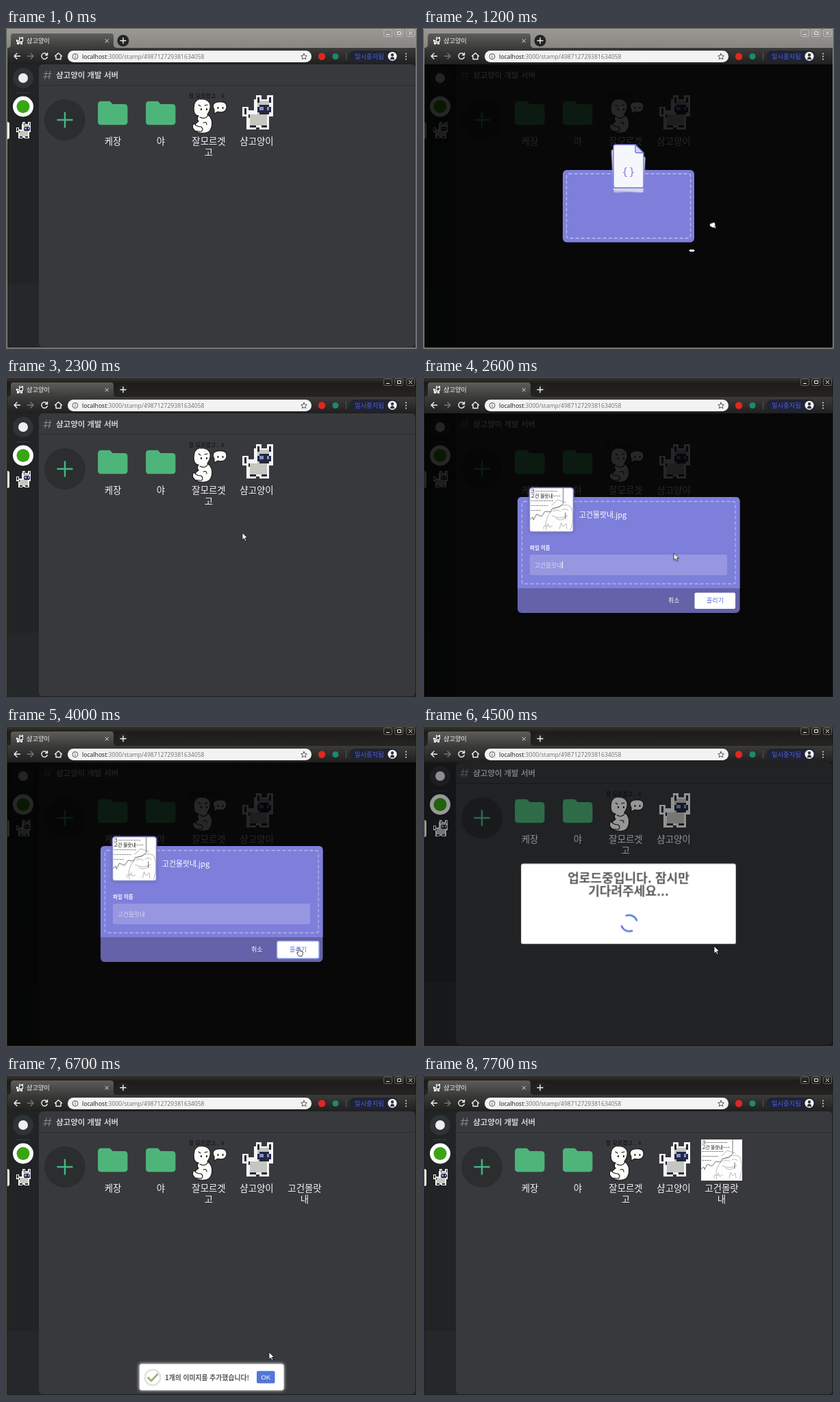
Animation, 600 px wide and 468 px high, one loop 10000 ms. Source, as an HTML page:

```html
<!DOCTYPE html>
<html lang="ko">
<head>
<meta charset="utf-8">
<title>샴고양이</title>
<style>
  html, body { margin: 0; width: 100%; height: 100%; overflow: hidden; background: #1c1b19; }
  svg { display: block; width: 100%; height: 100%; }
  text { font-family: "Noto Sans CJK KR", "Noto Sans CJK", "Noto Sans", sans-serif; }
  .latin { font-family: "Noto Sans", sans-serif; }
  .label { font-size: 13.4px; fill: #f4f4f4; text-anchor: middle; }
  .bold { font-weight: 700; }
  .line { fill: none; stroke-linecap: round; stroke-linejoin: round; }

  /* One loop lasts 10 s, so 1% is one 100 ms step. */
  .anim { animation: 10s step-end infinite; }
  #light { animation-name: light; }
  #dark { animation-name: dark; }
  #shade { animation-name: shade; }
  #drop { animation-name: drop; transform-origin: 300px 260px; }
  #leftPaper { animation-name: fanLeft; transform-origin: 300px 234px; }
  #rightPaper { animation-name: fanRight; transform-origin: 300px 234px; }
  #upload { animation-name: upload; transform-origin: 300px 260px; }
  #caret { animation-name: caret; }
  #ring { animation-name: ring; }
  #wait { animation-name: wait; transform-origin: 300px 260px; }
  #spinner { animation-name: spin; transform-origin: 301px 288px; }
  #progress { animation-name: progress; transform-origin: 2px 54px; }
  #newName { animation-name: newName; }
  #newImage { animation-name: newImage; }
  #toast { animation-name: toast; transform-origin: 300px 440px; }
  #check { animation-name: check; stroke-dasharray: 23; }
  #cursor { animation-name: move; }
  #grab { animation-name: grab; }
  #arrow { animation-name: arrow; }
  #hand { animation-name: hand; }

  @keyframes light { 0% { opacity: 1 } 21%, 100% { opacity: 0 } }
  @keyframes dark { 0% { opacity: 0 } 21%, 100% { opacity: 1 } }
  @keyframes shade {
    0% { opacity: 0 } 9% { opacity: .35 } 10% { opacity: .65 } 11% { opacity: .85 }
    20% { opacity: .55 } 21% { opacity: .2 } 22% { opacity: 0 }
    24% { opacity: .35 } 25% { opacity: .65 } 26% { opacity: .85 }
    41% { opacity: .6 } 42% { opacity: .25 } 43% { opacity: .3 } 44% { opacity: .4 }
    60% { opacity: .25 } 61%, 100% { opacity: 0 }
  }
  @keyframes drop {
    0% { opacity: 0; transform: scale(.8) } 9% { opacity: .3; transform: scale(.85) }
    10% { opacity: .7; transform: scale(.95) } 11% { opacity: 1; transform: none }
    20% { opacity: .55; transform: scale(.95) } 21%, 100% { opacity: 0; transform: scale(.8) }
  }
  @keyframes fanLeft {
    0% { transform: none } 12% { transform: rotate(-3deg); animation-timing-function: steps(3) }
    15%, 100% { transform: translate(-14px, 2px) rotate(-14deg) }
  }
  @keyframes fanRight {
    0% { transform: none } 12% { transform: rotate(3deg); animation-timing-function: steps(3) }
    15%, 100% { transform: translate(14px, 2px) rotate(14deg) }
  }
  @keyframes upload {
    0% { opacity: 0 } 24% { opacity: .35; transform: scale(.85) }
    25% { opacity: .7; transform: scale(.95) } 26% { opacity: 1; transform: none }
    41% { opacity: .5; transform: scale(.95) } 42%, 100% { opacity: 0 }
  }
  @keyframes caret { 0% { opacity: 0 } 26% { opacity: 1 } 31% { opacity: 0 } 36% { opacity: 1 } 39%, 100% { opacity: 0 } }
  @keyframes ring { 0% { opacity: 0 } 39% { opacity: 1 } 42%, 100% { opacity: 0 } }
  @keyframes wait {
    0% { opacity: 0 } 43% { opacity: .8; transform: scale(.88) } 44% { opacity: 1; transform: scale(1.04) }
    45% { opacity: 1; transform: scale(.98) } 46% { opacity: 1; transform: none }
    60% { opacity: .5; transform: scale(.8) } 61%, 100% { opacity: 0 }
  }
  @keyframes spin { 0% { transform: none } 44% { transform: none; animation-timing-function: steps(16) } 60%, 100% { transform: rotate(384deg) } }
  @keyframes progress {
    0% { opacity: 0 } 57% { opacity: 1; transform: scaleX(.4) } 58% { opacity: 1; transform: scaleX(.75) }
    59% { opacity: 1; transform: none } 61% { opacity: .4; transform: none } 62%, 100% { opacity: 0 }
  }
  @keyframes newName { 0% { opacity: 0 } 62%, 100% { opacity: 1 } }
  @keyframes newImage { 0% { opacity: 0 } 69%, 100% { opacity: 1 } }
  @keyframes toast {
    0% { opacity: 0 } 62% { opacity: .5; transform: translateY(-8px) rotate(2deg) }
    63% { opacity: 1; transform: translateY(-3px) rotate(1deg) } 64% { opacity: 1; transform: rotate(-1deg) }
    66% { opacity: 1; transform: none }
    72% { opacity: .65; transform: none } 73% { opacity: .3; transform: none } 74%, 100% { opacity: 0 }
  }
  @keyframes check { 0% { stroke-dashoffset: 23 } 63% { stroke-dashoffset: 23; animation-timing-function: steps(4) } 67%, 100% { stroke-dashoffset: 0 } }
  @keyframes move {
    0% { transform: translate(520px, 380px) }
    9% { transform: translate(520px, 380px); animation-timing-function: steps(3) }
    12% { transform: translate(418px, 282px); animation-timing-function: steps(6) }
    18% { transform: translate(350px, 232px); animation-timing-function: steps(4) }
    22% { transform: translate(345px, 227px) }
    24% { transform: translate(345px, 227px); animation-timing-function: steps(7) }
    31% { transform: translate(419px, 331px); animation-timing-function: steps(2) }
    33% { transform: translate(422px, 330px) }
    34% { transform: translate(422px, 330px); animation-timing-function: steps(3) }
    37% { transform: translate(424px, 323px) }
    42% { transform: translate(425px, 321px) }
    60% { transform: translate(425px, 321px); animation-timing-function: steps(7) }
    67% { transform: translate(384px, 404px); animation-timing-function: steps(4) }
    71%, 100% { transform: translate(380px, 447px) }
  }
  @keyframes grab { 0% { opacity: 0 } 9% { opacity: 1 } 21%, 100% { opacity: 0 } }
  @keyframes arrow { 0% { opacity: 0 } 21% { opacity: 1 } 31% { opacity: 0 } 42% { opacity: 1 } 70% { opacity: 0 } 76% { opacity: 1 } 77%, 100% { opacity: 0 } }
  @keyframes hand { 0% { opacity: 0 } 31% { opacity: 1 } 42% { opacity: 0 } 70% { opacity: 1 } 76%, 100% { opacity: 0 } }
</style>
</head>
<body>
<svg viewBox="0 0 600 468" preserveAspectRatio="none">
  <defs>
    <linearGradient id="lightBar" x2="0" y2="1"><stop stop-color="#9a9994"/><stop offset="1" stop-color="#878682"/></linearGradient>
    <linearGradient id="darkBar" x2="0" y2="1"><stop stop-color="#35342f"/><stop offset=".3" stop-color="#1d1c1a"/><stop offset="1" stop-color="#252422"/></linearGradient>
    <linearGradient id="tab" x2="0" y2="1"><stop stop-color="#5d5d5a"/><stop offset="1" stop-color="#3b3b3a"/></linearGradient>
    <linearGradient id="tools" x2="0" y2="1"><stop stop-color="#3b3b3a"/><stop offset="1" stop-color="#1f1f1f"/></linearGradient>
    <filter id="soft" x="-20%" y="-40%" width="140%" height="180%"><feGaussianBlur stdDeviation="2"/></filter>

    <symbol id="folder" viewBox="0 0 24 24">
      <path fill="#4eb57a" d="M10 4H4a2 2 0 0 0-2 2v12a2 2 0 0 0 2 2h16a2 2 0 0 0 2-2V8a2 2 0 0 0-2-2h-8z"/>
    </symbol>

    <symbol id="cat" viewBox="0 0 16 18" shape-rendering="crispEdges">
      <path fill="#f4f4f4" d="M6 2h1V0h3v2h3V0h3v11h-2v7H9v-1H7v1H2v-7H0V6h3v2h3z"/>
      <path fill="#c5c6c0" d="M8 3h6v7h-1v6H4v-6h4z"/>
      <path fill="#25283a" d="M8 1h1v3H8zM14 1h1v3h-1zM9 5h5v1h1v3h-1v1H9V9H8V6h1zM1 7h1v3H1zM3 10h1v2H3zM4 16h3v1H4zM10 16h3v1h-3z"/>
      <path fill="#7f8fe0" d="M9 6h2v2H9zM13 6h1v2h-1z"/>
    </symbol>

    <symbol id="sketch" viewBox="0 0 60 60">
      <path fill="#fefefe" d="M0 0h60v60H0z"/>
      <g class="line" stroke="#a8a8a8" stroke-width=".8">
        <path d="M23 58c-3-9 0-20 8-27S48 21 56 25c5 9 4 25 0 33M33 32q5-4 9 0M45 30q5-3 8 1M31 38q10 6 21 0M36 42q7 4 13-1M19 56q0-7 5-3l1-4 2 5 4-2M41 56l2-8 3 5 4-4 1 7M30 24l8-8 12 4"/>
      </g>
      <path class="line" stroke="#444" stroke-width=".7" d="M0 43l4-3 1 4 4-8 7 3 5-7 7 1 3-5 10-2 5-5V0"/>
      <g fill="#111" font-size="6.3">
        <text x="1" y="6.5">크~~~~~~~~~</text><text x="1" y="13.5">고건 몰랏내~~~</text>
        <text x="1" y="20">~~~~~~~~~</text><text x="1" y="26.5">~~~~~~~</text><text x="1" y="33">~~~~</text>
      </g>
      <path class="line" stroke="#333" stroke-width=".7" d="M49 34v8"/>
    </symbol>

    <g id="winButtons">
      <g fill="none" stroke="currentColor" stroke-width=".8">
        <rect x="551.5" y="2.5" width="12" height="10" rx="2"/><rect x="567.5" y="2.5" width="12" height="10" rx="2"/><rect x="584.5" y="2.5" width="12" height="10" rx="2"/>
      </g>
      <path fill="none" stroke="#eee" d="M555 9.5h5M571.5 5.500h5v4h-5zM588 5l5 5m0-5l-5 5"/>
    </g>
    <path id="paper" d="M281 170h29l12 12v49q0 2-2 2h-39q-3 0-3-3v-57q0-3 3-3z"/>
    <clipPath id="page"><path d="M2 53h596v413H2z"/></clipPath>
  </defs>

  <!-- Window frame -->
  <g id="dark" class="anim" color="#77756f">
    <path fill="#24231f" d="M0 0h600v468H0z"/>
    <path fill="url(#darkBar)" d="M1 1h598v28H1z"/>
    <path fill="none" stroke="#5c5a54" stroke-width=".8" d="M.5 467.500V3q0-2.500 2.500-2.500h594q2.500 0 2.500 2.500v464.500z"/>
    <use href="#winButtons"/>
  </g>
  <g id="light" class="anim" color="#c4c3bf">
    <path fill="#8d8c88" d="M0 0h600v468H0z"/>
    <path fill="url(#lightBar)" d="M1 1h598v28H1z"/>
    <path fill="none" stroke="#55544f" stroke-width=".8" d="M.5 467.500V3q0-2.500 2.500-2.500h594q2.500 0 2.500 2.500v464.500z"/>
    <use href="#winButtons"/>
  </g>

  <!-- Tab and toolbar -->
  <path fill="url(#tab)" d="M2 29q5 0 5-5V12q0-4 4-4h142q4 0 4 4v12q0 5 5 5z"/>
  <path fill="url(#tools)" d="M2 29h596v24H2z"/>
  <use href="#cat" x="15" y="13" width="10" height="11"/>
  <text x="30" y="22" font-size="9.2" fill="#f2f2f2">샴고양이</text>
  <path class="line" stroke="#ddd" d="M145 16.500l4.500 4.500m0-4.500l-4.500 4.500"/>
  <circle cx="171" cy="18.500" r="8.500" fill="#232321"/>
  <path class="line" stroke="#f2f2f2" stroke-width="1.400" d="M167 18.500h8m-4-4v8"/>
  <g class="line" stroke="#f2f2f2" stroke-width="1.400">
    <path d="M20.500 41h-8.500m4-4l-4 4 4 4"/>
    <path stroke="#777" d="M31.500 41h8.500m-4-4l4 4-4 4"/>
    <path d="M60 39a4.300 4.300 0 1 0 .2 3.500M60.500 36.500v3h-3"/>
    <path d="M71.500 41l5-4.500 5 4.500M73 40.500v5h7v-5"/>
  </g>
  <rect x="90" y="33" width="356" height="17" rx="8.500" fill="#f3f3f3"/>
  <circle cx="101" cy="41.500" r="4" fill="none" stroke="#555"/>
  <path stroke="#555" d="M101 41v2.500M101 39v1"/>
  <text class="latin" x="111" y="44.500" font-size="8.600" fill="#777"><tspan fill="#222">localhost</tspan>:3000/stamp/498712729381634058</text>
  <path class="line" stroke="#555" d="M435 37.300l1.300 2.800 3 .4-2.200 2.100.6 3-2.700-1.500-2.700 1.500.6-3-2.200-2.100 3-.4z"/>
  <circle cx="461" cy="41.500" r="5.200" fill="#e0281f"/>
  <circle cx="481" cy="41.500" r="4.500" fill="#1f8a68"/>
  <path stroke="#555" d="M496.500 36v11"/>
  <rect x="501" y="33" width="72" height="17" rx="8.500" fill="#202333"/>
  <text x="509" y="45" font-size="9.300" fill="#4d60e6">일시중지됨</text>
  <circle cx="564" cy="41.200" r="6.500" fill="#f5f5f5"/>
  <path fill="#333" d="M564 37a2.200 2.200 0 0 1 0 4.400 2.200 2.200 0 0 1 0-4.400M561 46q0-4 3-4t3 4z"/>
  <path class="line" stroke="#f2f2f2" stroke-width="1.800" d="M584 37.500v0M584 41.500v0M584 45.500v0"/>

  <g clip-path="url(#page)">
    <!-- Sidebar -->
    <path fill="#202425" d="M2 53h596v413H2z"/>
    <path fill="#25282a" d="M2 373h50v93H2z"/>
    <circle cx="25" cy="73" r="15" fill="#303336"/>
    <circle cx="25" cy="73" r="7" fill="#eee"/>
    <path stroke="#383b3e" d="M15 94.500h20"/>
    <circle cx="25" cy="114.500" r="15" fill="#fff"/>
    <circle cx="25" cy="114.500" r="9.500" fill="#3aa514"/>
    <use href="#cat" x="14" y="137" width="23" height="24"/>
    <path fill="#fff" d="M2 137q3 0 3 3v19q0 3-3 3z"/>

    <!-- Stamp list -->
    <rect x="48" y="53" width="549.500" height="412.500" rx="6" fill="#38393d"/>
    <path stroke="#292b2e" d="M48 83.500h550"/>
    <path class="line" stroke="#85888c" stroke-width="1.200" d="M59 63l-2 11M64.500 63l-2 11M55.500 66.500h10.500M54.500 71h10.500"/>
    <text class="bold" x="73" y="72.700" font-size="11.500" fill="#cbccce">샴고양이 개발 서버</text>
    <circle cx="86" cy="134" r="30" fill="#2b2d2f"/>
    <path stroke="#43b581" stroke-width="2.500" d="M74.500 134h23M86 122.500v23"/>
    <use href="#folder" x="129.800" y="98" width="52" height="52"/>
    <use href="#folder" x="199.800" y="98" width="52" height="52"/>
    <text x="267" y="101.500" font-size="8" fill="#0b0b0b">잘 모르겠고 . ㅎ</text>
    <g fill="#fbfbf8" stroke="#161616" stroke-width="1.100">
      <path d="M281 128c-7 0-8-10-6-17 1-5 6-8 10-7 5-1 12 2 13 8 1 6-1 10-4 14 7 4 9 15 4 23-4 6-18 5-22 1-4-5 0-11 5-14-2-2-2-5 0-8z"/>
      <path d="M274 139q-4 6 2 11l9 1q4-3 0-7-7 0-11-5z"/>
      <path d="M304 119q-5-9 5-11 14-2 13 8-2 9-13 6l-5 3z"/>
      <path class="line" d="M281 112l3 2M290 113l4-1M283 130q8 4 12-3M288 138q5-2 5 3"/>
      <path class="line" stroke-width="2" d="M285 118v1M293 118v1M309.500 116v1M316.500 116v1"/>
    </g>
    <use href="#cat" x="344.500" y="98" width="46" height="50"/>
    <g class="label">
      <text x="156" y="170">케장</text><text x="226" y="170">야</text>
      <text x="296" y="170">잘모르겟</text><text x="296" y="186">고</text>
      <text x="366" y="170">샴고양이</text>
      <g id="newName" class="anim"><text x="436" y="170">고건몰랏</text><text x="436" y="186">내</text></g>
    </g>
    <use id="newImage" class="anim" href="#sketch" x="406" y="94" width="60" height="60"/>

    <path id="progress" class="anim" fill="#5cc596" d="M2 53h596v1.500H2z"/>
    <path id="shade" class="anim" d="M2 53h596v413H2z"/>

    <!-- Drop zone -->
    <g id="drop" class="anim">
      <rect x="204" y="207" width="192" height="105.500" rx="6" fill="#7e7fda"/>
      <rect x="209.500" y="212.500" width="181" height="94" rx="3" fill="none" stroke="#bcbdf0" stroke-width="1.300" stroke-dasharray="5 3"/>
      <g fill="#d4d6e8" stroke="#8f94df" stroke-width=".8">
        <use id="leftPaper" class="anim" href="#paper" y="6"/>
        <use id="rightPaper" class="anim" href="#paper" y="6"/>
      </g>
      <use href="#paper" fill="#f6f7fc" stroke="#6c70dc" stroke-width="1.300"/>
      <path fill="#d3d5f6" stroke="#6c70dc" stroke-width="1.300" stroke-linejoin="round" d="M310 170v10q0 2 2 2h10z"/>
      <text x="300" y="215" font-size="17" fill="#8486dc" text-anchor="middle" style="font-family:'Noto Sans Mono',monospace">{}</text>
    </g>

    <!-- Upload form -->
    <g id="upload" class="anim">
      <rect x="138" y="175" width="324.500" height="169" rx="6" fill="#6462a8"/>
      <path fill="#7e7fda" d="M138 308V181q0-6 6-6h312.500q6 0 6 6v127z"/>
      <rect x="144.500" y="181.500" width="311.500" height="120" rx="3" fill="none" stroke="#b4b5ee" stroke-width="1.300" stroke-dasharray="5 3"/>
      <rect x="155" y="162" width="65" height="65" rx="4" fill="#4f5099" opacity=".7" filter="url(#soft)"/>
      <use href="#sketch" x="156" y="162" width="63.500" height="63.500"/>
      <rect x="155.500" y="161.500" width="64" height="64.500" rx="4" fill="none" stroke="#8586c8" stroke-width="1.500"/>
      <text x="228" y="205" font-size="10.900" fill="#fff">고건몰랏내.jpg</text>
      <text class="bold" x="156" y="252" font-size="7.500" fill="#f4f4ff">파일 이름</text>
      <rect x="156" y="259" width="288" height="30" rx="3" fill="#9796e0"/>
      <text x="163" y="277.500" font-size="8.700" fill="#d4d4f5">고건몰랏내</text>
      <path id="caret" class="anim" stroke="#fff" d="M203.500 269v10"/>
      <text x="358" y="329.300" font-size="9" fill="#fff">취소</text>
      <rect id="ring" class="anim" x="395" y="313" width="62.500" height="26.500" rx="3" fill="#a5b7f5"/>
      <rect x="396.500" y="314.500" width="59.500" height="23.500" rx="2" fill="#fff"/>
      <text x="426.500" y="329.300" font-size="9" fill="#5d70dc" text-anchor="middle">올리기</text>
    </g>

    <!-- Waiting dialog -->
    <g id="wait" class="anim">
      <rect x="140" y="199.500" width="320" height="119.500" rx="3" fill="#fff"/>
      <g class="bold" font-size="18.500" fill="#595959" text-anchor="middle">
        <text x="300" y="228">업로드중입니다. 잠시만</text><text x="300" y="247">기다려주세요...</text>
      </g>
      <path id="spinner" class="anim line" stroke="#4f76d9" stroke-width="2.600" d="M292.500 279.500a12 12 0 0 1 17 0M292.500 296.500a12 12 0 0 0 17 0"/>
    </g>

    <!-- Toast -->
    <g id="toast" class="anim">
      <rect x="194" y="420.500" width="212" height="39.500" rx="4" fill="#d9d9d9" filter="url(#soft)"/>
      <rect x="195" y="421.500" width="210.500" height="38" rx="3" fill="#fff"/>
      <circle cx="214" cy="441" r="11.300" fill="none" stroke="#e1e4dc" stroke-width="2.600"/>
      <path id="check" class="anim line" stroke="#9cb07f" stroke-width="2.800" d="M207.500 441.500l4.500 4.500 9-9.500"/>
      <text class="bold" x="232" y="444.500" font-size="9.800" fill="#545454">1개의 이미지를 추가했습니다!</text>
      <rect x="366" y="431.500" width="26.500" height="18" rx="2" fill="#5177d8"/>
      <text x="379.200" y="444" font-size="9.700" fill="#fff" text-anchor="middle" style="font-family:'Liberation Sans',sans-serif">OK</text>
    </g>
  </g>

  <!-- Pointer -->
  <g id="cursor" class="anim" fill="#fff" stroke="#111" stroke-width=".8" stroke-linejoin="round">
    <g id="grab" class="anim">
      <path d="M1 4l1-2 2 1V1l2 1 2-1 1 5 1 5-3-2H4L0 6z"/>
      <path d="M7 6.500l3 1-1 1 1.500 1.500"/>
      <path stroke="none" d="M-30 42.500l3-2v4zM-21 42.500l-3-2v4zM-27 41h3v3h-3z"/>
    </g>
    <path id="arrow" class="anim" d="M0 0v10.500l2.500-2.300 1.700 3.800 1.700-.8-1.700-3.600h3.300z"/>
    <path id="hand" class="anim" d="M3.500.5q1.400 0 1.400 1.400V5l3.200.6q1.400.3 1.400 1.700L9 10.500l-1 2H3.700L.8 8.600Q.3 7 2 7.600l.3.300v-6Q2.300.5 3.500.5z"/>
  </g>
</svg>
</body>
</html>
```
